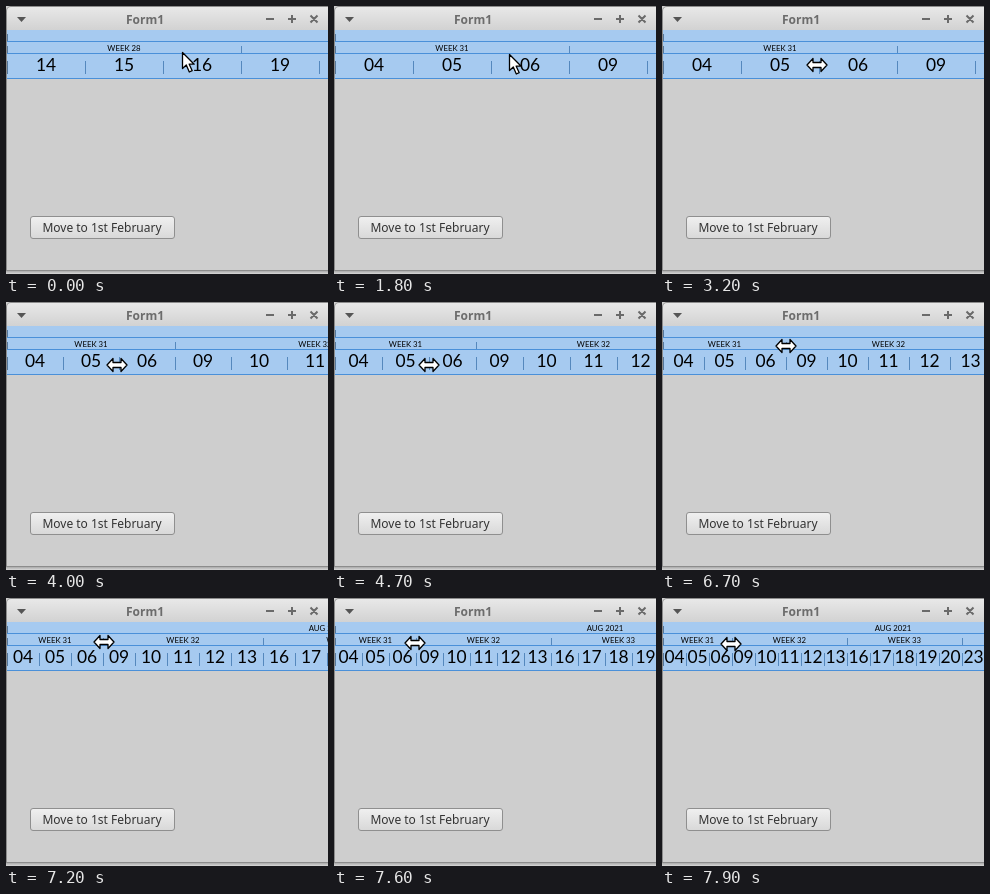
Animation of 322x268 px, one loop 8 s. Source, as an HTML page:

```html
<!DOCTYPE html>
<html lang="en">
<head>
<meta charset="utf-8">
<title>Timeline</title>
<style>
html, body { margin: 0; width: 100%; height: 100%; overflow: hidden; background: #cecece; }
svg { display: block; }
.mid { text-anchor: middle; }
.title { font: bold 12px "Noto Sans", sans-serif; fill: #6c6c6c; }
.button { font: 12px "Noto Sans", sans-serif; fill: #333; }
.day { font: 17.4px Lato, sans-serif; fill: #000; }
.group { font: 7.8px Lato, sans-serif; fill: #000; }
</style>
</head>
<body>
<svg width="322" height="268" viewBox="0 0 322 268">
  <defs>
    <linearGradient id="bar" x2="0" y2="1"><stop stop-color="#e9e9e9"/><stop offset="1" stop-color="#d2d2d2"/></linearGradient>
    <linearGradient id="face" x2="0" y2="1"><stop stop-color="#f0f0f0"/><stop offset="1" stop-color="#d8d8d8"/></linearGradient>
    <linearGradient id="shade" x2="0" y2="1"><stop stop-color="#aaa"/><stop offset="1" stop-color="#d8d8d8"/></linearGradient>
  </defs>
  <rect width="322" height="268" fill="#cecece"/>
  <path d="M0 24V5Q0 0 5 0H322V24Z" fill="url(#bar)"/>
  <path d="M.5 264V5Q.5 .5 5 .5H322" fill="none" stroke="#8c8c8c"/>
  <path d="M11 11h9l-4.5 5z" fill="#555"/>
  <path d="M260 13h8M282 13h8M286 9v8M304.500 9.500l7 7m0-7l-7 7" fill="none" stroke="#6a6a6a" stroke-width="2"/>
  <text class="title mid" x="139" y="18">Form1</text>
  <rect x="1" y="24" width="321" height="49" fill="#a6caf0"/>
  <path d="M1 35.500H322M1 47.500H322M1 72.500H322" stroke="#4a90d9"/>
  <rect y="264" width="322" height="1" fill="#8c8c8c"/>
  <rect y="265" width="322" height="3" fill="url(#shade)"/>
  <rect x="24.500" y="210.500" width="144" height="22" rx="2.500" fill="url(#face)" stroke="#8f8f8f"/>
  <text class="button mid" x="96" y="226">Move to 1st February</text>
  <g id="scale"></g>
  <path id="cursor" fill="#fff" stroke="#000" stroke-width="1.3" stroke-linejoin="round"/>
</svg>
<script>
const LOOP = 8000, STEP = 100, DAY_MS = 864e5;
const MONDAY = Date.UTC(2021, 6, 12), FIRST_WEEK = 28;
const ARROW = "M.5 .5V16.500L4.300 13L7.300 20L10.200 18.700L7.200 12.200H12.200Z";
const RESIZE = "M-10 0L-4 -6.500V-2.500H4V-6.500L10 0L4 6.500V2.500H-4V6.500Z";

// [time, first working day counted from MONDAY]
const starts = [[0, 2], [400, 3], [600, 6], [700, 12], [800, 19], [1300, 17]];
// [time, day width]
const widths = [[3200, 78], [4000, 56], [4700, 47], [6400, 47], [7200, 32], [7900, 23]];
// [time, x, y]
const moves = [
  [1700, 176, 46], [1800, 175, 48], [2200, 168, 61], [2400, 160, 62], [2600, 157, 59],
  [3100, 157, 59], [3200, 155, 59], [4000, 111, 63], [4700, 95, 63], [4900, 95, 63],
  [5000, 98, 61], [5200, 138, 43], [5300, 145, 46], [5500, 145, 46], [5800, 140, 44],
  [6400, 140, 44], [7200, 98, 44], [7900, 69, 46]
];

function lerp(keys, t, col = 1) {
  const n = keys.findIndex(k => k[0] >= t);
  if (n < 0) return keys[keys.length - 1][col];
  if (n === 0) return keys[0][col];
  const a = keys[n - 1], b = keys[n];
  return a[col] + (b[col] - a[col]) * (t - a[0]) / (b[0] - a[0]);
}

const dateOf = i => new Date(MONDAY + (Math.floor(i / 5) * 7 + i % 5) * DAY_MS);
const weekOf = i => "WEEK " + (FIRST_WEEK + Math.floor(i / 5));
const monthOf = i => {
  const d = dateOf(i);
  return ["JUL", "AUG", "SEP", "OCT"][d.getUTCMonth() - 6] + " " + d.getUTCFullYear();
};

const label = (kind, x, y, s) => `<text class="${kind} mid" x="${x}" y="${y}">${s}</text>`;
const tick = (x, y, h) =>
  `<rect x="${x}" y="${y}" width="1" height="${h}" fill="${x === 1 ? "#56789c" : "#5588bd"}"/>`;

// One header row: a tick and a centred caption per run of equal names
function groups(name, first, w, y) {
  let out = "", from = first;
  for (let i = first + 1; i < first + 40; i++) {
    if (name(i) === name(from)) continue;
    const x = 1 + (from - first) * w;
    if (x < 322) out += tick(x, y - 5, 7) + label("group", x + (i - from) * w / 2, y, name(from));
    from = i;
  }
  return out;
}

function draw(t) {
  const first = starts.filter(s => s[0] <= t).pop()[1];
  const w = Math.round(lerp(widths, t));
  let out = groups(monthOf, first, w, 33) + groups(weekOf, first, w, 45);
  for (let i = first, x = 1; x < 322; i++, x += w) {
    const day = String(dateOf(i).getUTCDate()).padStart(2, "0");
    out += tick(x, 55, 13) + label("day", x + w / 2, 65, day);
  }
  scale.innerHTML = out;
  const arrow = t < 2600 || (t >= 5000 && t < 5800);
  cursor.setAttribute("d", arrow ? ARROW : RESIZE);
  cursor.setAttribute("transform",
    `translate(${Math.round(lerp(moves, t, 1))} ${Math.round(lerp(moves, t, 2))})`);
}

const scale = document.getElementById("scale"), cursor = document.getElementById("cursor");
const begin = performance.now();
let shown = -1;
function frame() {
  const t = Math.floor((performance.now() - begin) % LOOP / STEP) * STEP;
  if (t !== shown) draw(shown = t);
  requestAnimationFrame(frame);
}
frame();
</script>
</body>
</html>
```
